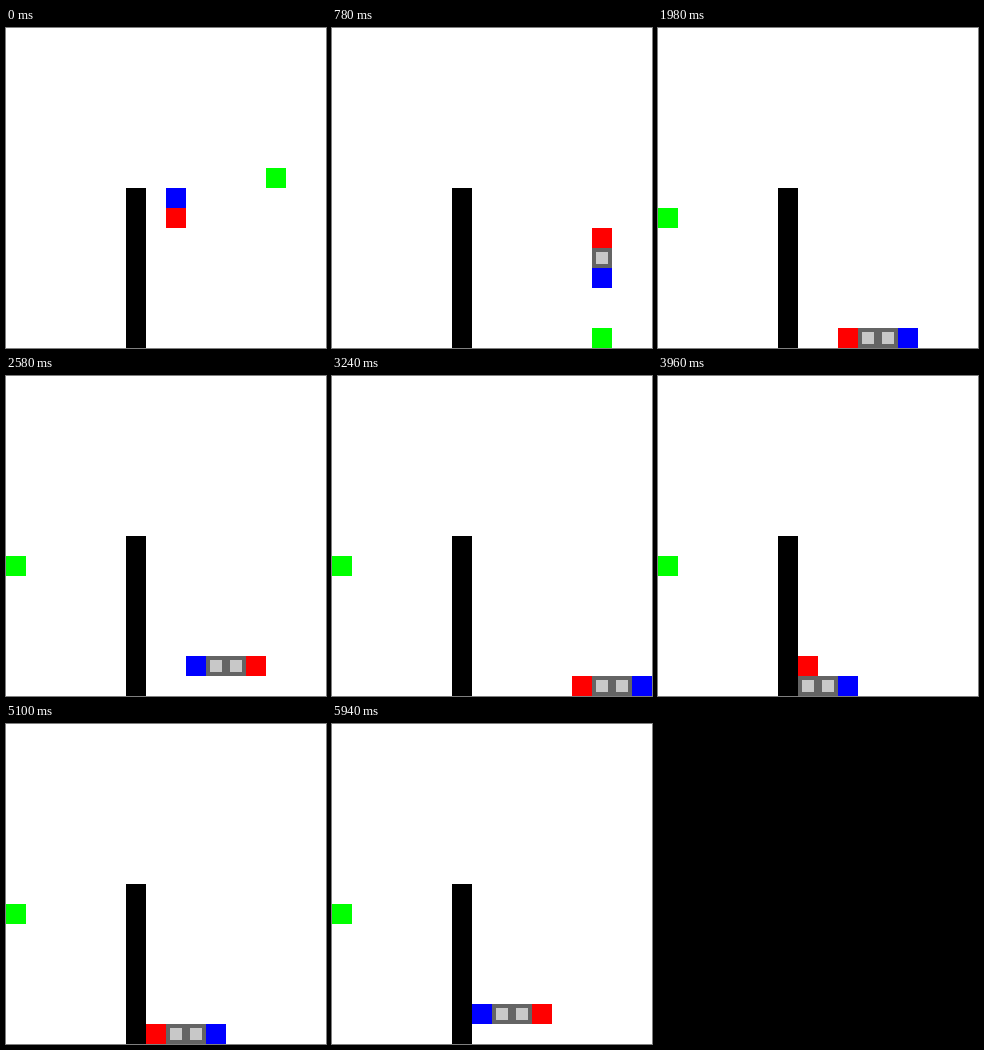
Recreate the animation shown at these times as an HTML page with a canvas. Size 320 by 320 pixels, loop 6000 ms.

```html
<!DOCTYPE html>
<html lang="en">
<head>
<meta charset="utf-8">
<title>Snake</title>
<style>
  html, body { margin: 0; width: 100%; height: 100%; overflow: hidden; background: #fff; }
  canvas { display: block; }
</style>
</head>
<body>
<canvas id="board" width="320" height="320"></canvas>
<script>
const ctx = document.getElementById('board').getContext('2d');
const CELL = 20, STEP_MS = 60, STEPS = 100;

const DIRS = { U: [0, -1], D: [0, 1], L: [-1, 0], R: [1, 0] };
const LAP = 'U' + 'L'.repeat(8) + 'D' + 'R'.repeat(8);
const MOVES = 'U' + 'RRRRRURDL' + 'D'.repeat(7) + 'RR' + LAP.repeat(5);

// Cells visited by the head; path[0] is the tail at the start.
const path = [[8, 9]];
for (const move of MOVES) {
  const [x, y] = path[path.length - 1];
  const [dx, dy] = DIRS[move];
  path.push([x + dx, y + dy]);
}

// Each meal moves the food and adds one segment.
const STAGES = [
  { from: 0, food: [13, 7], length: 2 },
  { from: 6, food: [13, 15], length: 3 },
  { from: 16, food: [0, 9], length: 4 },
];

function fillCell([x, y], color, inset = 0) {
  ctx.fillStyle = color;
  const size = CELL - 2 * inset;
  ctx.fillRect(x * CELL + inset, y * CELL + inset, size, size);
}

function draw(step) {
  const { food, length } = STAGES.findLast(stage => step >= stage.from);
  const head = step + 1, tail = head - length + 1;

  ctx.fillStyle = '#fff';
  ctx.fillRect(0, 0, 320, 320);
  for (let y = 8; y < 16; y++) fillCell([6, y], '#000');
  fillCell(food, '#0f0');

  for (let i = tail + 1; i < head; i++) {
    fillCell(path[i], '#646464');
    fillCell(path[i], '#c8c8c8', 4);
  }
  fillCell(path[tail], '#f00');
  fillCell(path[head], '#00f');
}

function tick() {
  draw(Math.floor(performance.now() / STEP_MS) % STEPS);
  requestAnimationFrame(tick);
}
tick();
</script>
</body>
</html>
```
